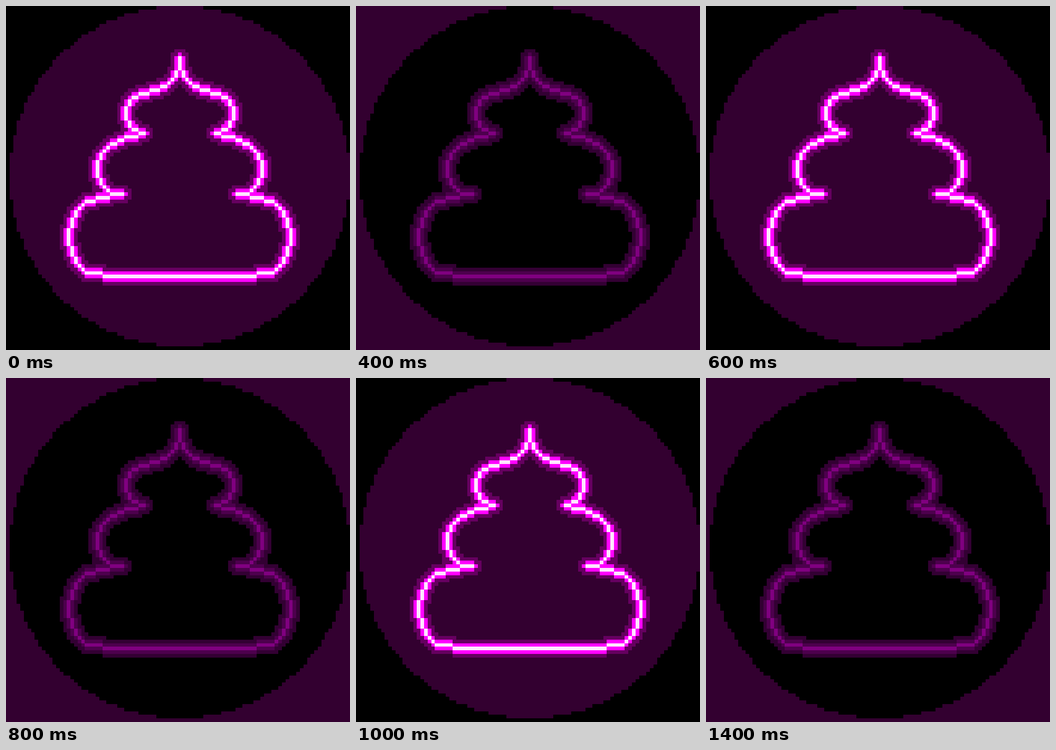
Write an HTML page that moves like this. It is 748x748 px and loops after 1600 ms.

```html
<!DOCTYPE html>
<html lang="en">
<head>
<meta charset="utf-8">
<title>Neon sign</title>
<style>
  html, body { margin: 0; width: 100%; height: 100%; overflow: hidden; background: #000; }
  svg { display: block; width: 100vw; height: 100vh; }
</style>
</head>
<body>
<svg viewBox="0 0 96 96" shape-rendering="crispEdges">
  <rect id="wall" width="96" height="96"/>
  <path id="disc"/>
  <path id="glow"/>
  <path id="tube"/>
  <path id="core"/>
</svg>
<script>
const SIZE = 96, AXIS = 48;
const layers = ['wall', 'disc', 'glow', 'tube', 'core'];
const lit = ['#000000', '#330030', '#660060', '#ff00ff', '#ffe6ff'];
const unlit = ['#330030', '#000000', '#330033', '#4d004d', '#800080'];
const LOOP = 1600;
const switches = [400, 600, 800, 1000, 1400];

// Left half of the outline, one stroke per tier, in grid cells.
const strokes = [
  '48,14 48,17 47,18 47,19 44,22 43,22 42,23 40,23 39,24 37,24 36,25 35,25 34,26 34,27 33,28 33,31 34,32 34,33 35,34 36,34 37,35 38,35',
  '36,36 33,36 32,37 31,37 30,38 29,38 26,41 26,42 25,43 25,47 26,48 26,49 29,52 32,52',
  '28,53 25,53 24,54 22,54 19,57 19,58 18,59 18,61 17,62 17,66 18,67 18,69 19,70 19,71 22,74 26,74 27,75 48,75'
];

function traceOutline() {
  const cells = [];
  for (const stroke of strokes) {
    const points = stroke.split(' ').map(p => p.split(',').map(Number));
    points.slice(1).forEach(([x1, y1], i) => {
      const [x0, y0] = points[i];
      const steps = Math.max(Math.abs(x1 - x0), Math.abs(y1 - y0));
      for (let s = 0; s <= steps; s++) {
        const x = x0 + (x1 - x0) * s / steps;
        const y = y0 + (y1 - y0) * s / steps;
        cells.push([x, y], [2 * AXIS - x, y]);
      }
    });
  }
  return cells;
}

// Path of whole cells, merged into horizontal runs.
function cellPath(inside) {
  let d = '';
  for (let y = 0; y < SIZE; y++) {
    for (let x = 0; x < SIZE; x++) {
      if (!inside(x, y)) continue;
      const start = x;
      while (x < SIZE && inside(x, y)) x++;
      d += `M${start} ${y}H${x}v1H${start}z`;
    }
  }
  return d;
}

const outline = traceOutline();
const near = limit => (x, y) =>
  outline.some(([cx, cy]) => (x - cx) ** 2 + (y - cy) ** 2 <= limit);
const nearGlow = near(5);
const shapes = {
  disc: (x, y) => (x - 48) ** 2 + (y - 47) ** 2 <= 2256,
  glow: (x, y) => nearGlow(x, y) && (y < 77 || Math.abs(x - AXIS) <= 21),
  tube: near(1),
  core: near(0)
};

const parts = layers.map(id => document.getElementById(id));
for (const id in shapes) {
  document.getElementById(id).setAttribute('d', cellPath(shapes[id]));
}

function render(ms) {
  const t = ms % LOOP;
  const passed = switches.filter(at => t >= at).length;
  const colors = passed % 2 ? unlit : lit;
  parts.forEach((part, i) => part.setAttribute('fill', colors[i]));
}

let start;
function tick(now) {
  start ??= now;
  render(now - start);
  requestAnimationFrame(tick);
}
render(0);
requestAnimationFrame(tick);
</script>
</body>
</html>
```
